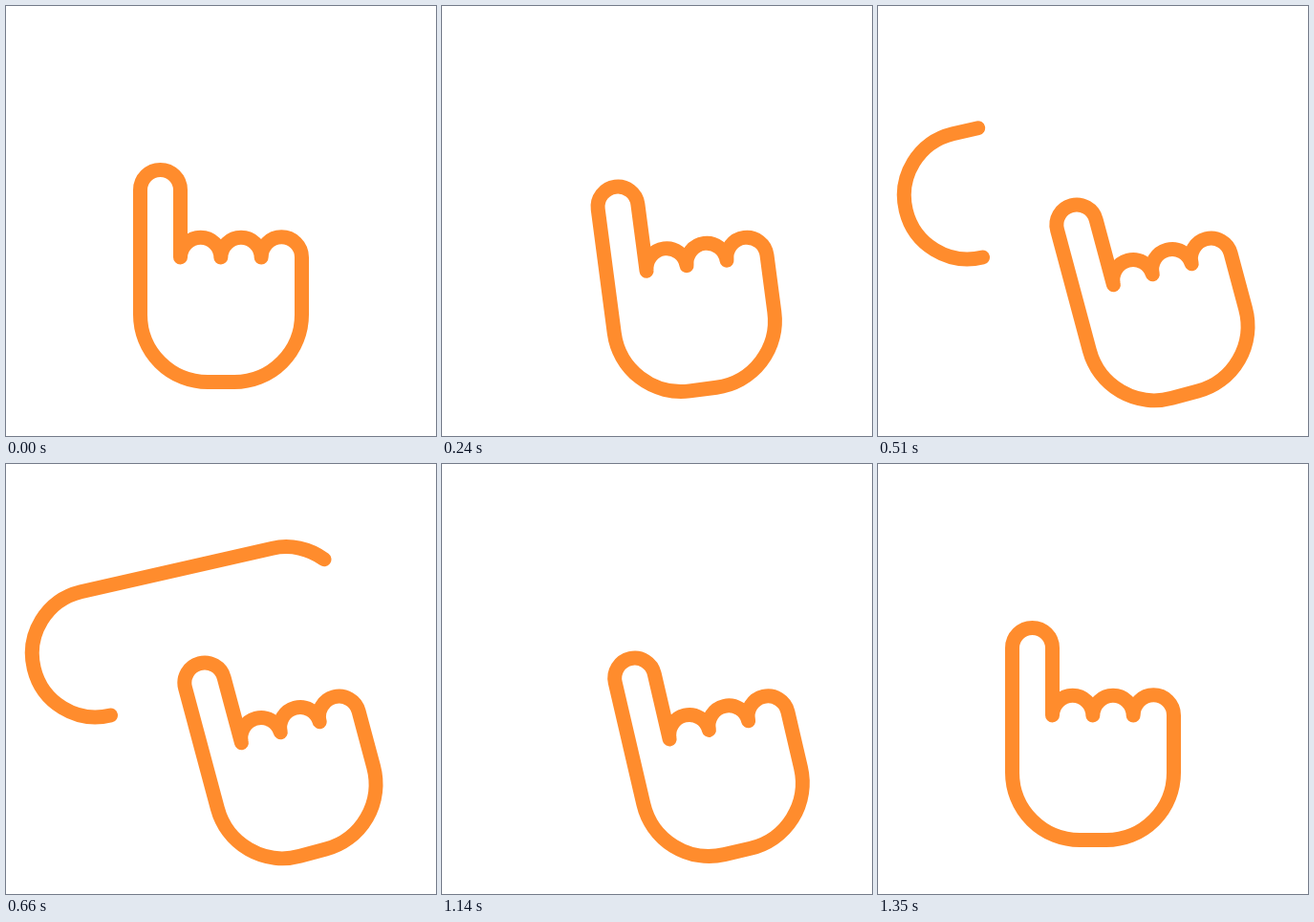
An HTML page for the animation above (1500 ms loop, 450 by 450 pixels).

```html
<!DOCTYPE html>
<html lang="en">
<head>
<meta charset="utf-8">
<title>Tap gesture</title>
<style>
  html, body { margin: 0; width: 100%; height: 100%; overflow: hidden; background: #fff; }
  svg { display: block; width: 100%; height: 100%; }
  path { fill: none; stroke: #ff8c2d; stroke-width: 15; stroke-linecap: round; stroke-linejoin: round; }
</style>
</head>
<body>
<svg viewBox="0 0 450 450">
  <path id="trail" pathLength="1"
    d="M109.5 263 A66.5 66.5 0 1 1 78.3 133.7 L278.8 88.2 A66.5 66.5 0 0 1 333 99.8"/>
  <path id="hand"
    d="M140.5 192.5 a21 21 0 0 1 42 0 V263
       a21.17 21.17 0 0 1 42.33 0 a21.17 21.17 0 0 1 42.33 0 a21.17 21.17 0 0 1 42.34 0
       V323 a70.5 70.5 0 0 1 -70.5 70.5 h-28 a70.5 70.5 0 0 1 -70.5 -70.5 Z"/>
</svg>
<script>
  const LOOP = 1500, STEP = 30;
  const hand = document.getElementById('hand');
  const trail = document.getElementById('trail');

  // Eased progress of t from a to b, held at 0 and 1 outside
  function ease(t, a, b) {
    const p = Math.min(1, Math.max(0, (t - a) / (b - a)));
    return p * p * (3 - 2 * p);
  }

  function draw(t) {
    const lean = ease(t, 120, 360) - ease(t, 1080, 1350);
    hand.setAttribute('transform',
      `translate(${67.5 * lean} ${17 * lean}) rotate(${-15 * lean} 225 282.5)`);

    const head = ease(t, 360, 660);
    const tail = ease(t, 660, 900);
    const shown = head - tail;
    trail.style.display = shown > 0 ? '' : 'none';
    trail.setAttribute('stroke-dasharray', `${shown} 2`);
    trail.setAttribute('stroke-dashoffset', -tail);
  }

  const start = performance.now();
  function tick() {
    const t = (performance.now() - start) % LOOP;
    draw(Math.floor(t / STEP) * STEP);
    requestAnimationFrame(tick);
  }
  tick();
</script>
</body>
</html>
```
